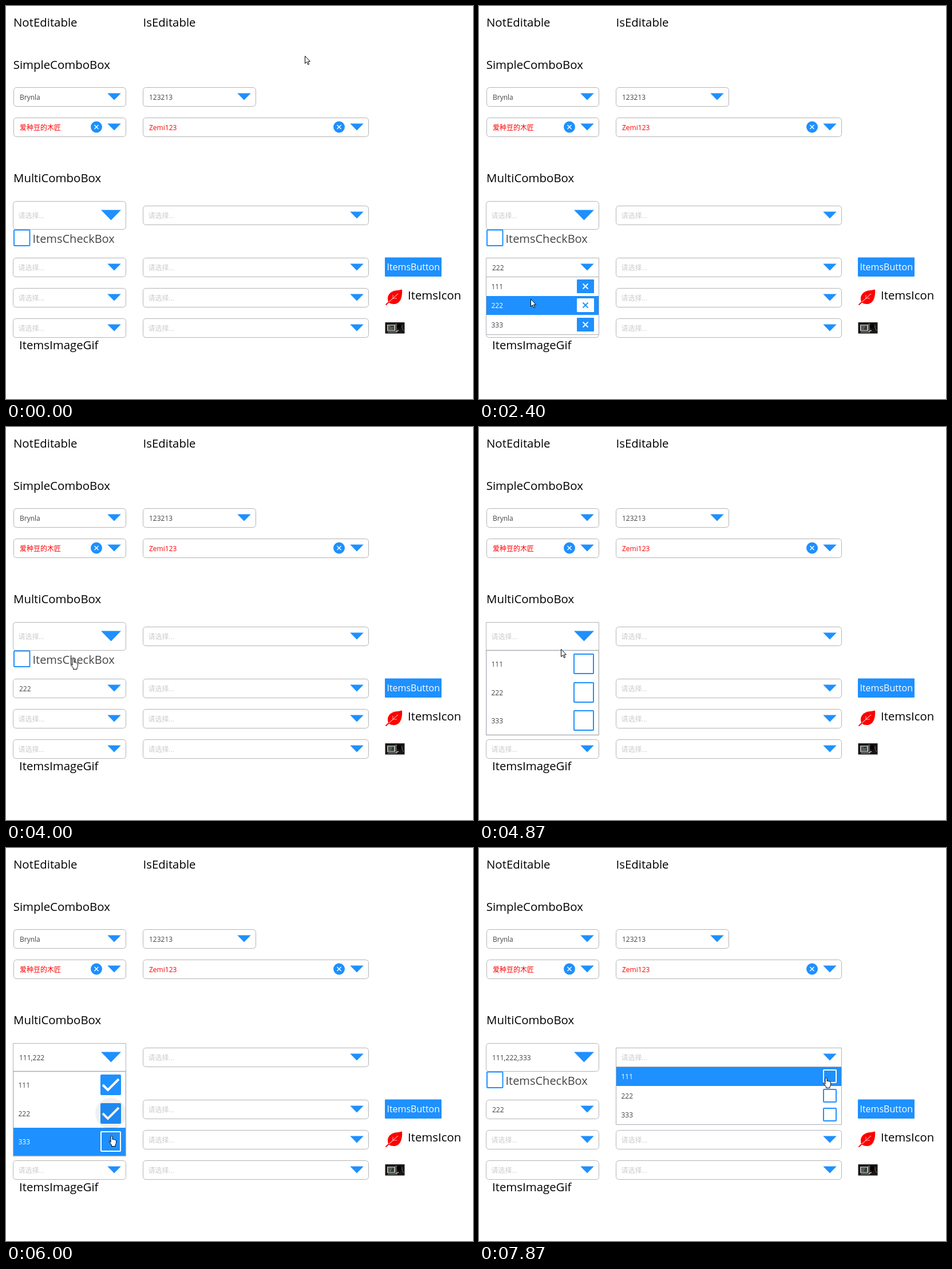
Recreate the animation shown at these times as an HTML page with a canvas. Size 816 by 687 pixels, loop 8 s.

```html
<!DOCTYPE html>
<html lang="zh-CN">
<head>
<meta charset="utf-8">
<style>
html, body { margin: 0; width: 100%; height: 100%; overflow: hidden; background: #fff; }
canvas { display: block; }
</style>
</head>
<body>
<canvas id="stage" width="816" height="687"></canvas>
<script>
const ctx = document.getElementById('stage').getContext('2d');
const LOOP = 8000, BLUE = '#1e90ff', BORDER = '#b4b4b4', DARK = '#444';
const FONT = '"Open Sans", "Noto Sans CJK SC", "Noto Sans CJK", sans-serif';
const ITEMS = ['111', '222', '333'];

// Pointer path: time, left, top
const PATH = [
  [0, 522, 87], [70, 522, 87], [330, 350, 122], [600, 187, 155], [800, 187, 155],
  [1200, 190, 300], [1600, 186, 453], [1780, 186, 453], [2270, 90, 512], [2480, 90, 512],
  [3000, 150, 308], [3330, 130, 345], [3470, 130, 345], [3730, 113, 405], [4000, 113, 405],
  [4130, 168, 359], [4270, 172, 359], [4400, 179, 361], [4640, 179, 361], [4870, 143, 388],
  [5130, 179, 410], [5400, 179, 410], [5640, 181, 458], [5820, 181, 458], [6000, 180, 503],
  [6220, 180, 503], [6470, 190, 358], [6670, 190, 358], [6930, 300, 362], [7330, 607, 361],
  [7480, 607, 361], [7730, 605, 395], [7870, 602, 401], [8000, 602, 401]
];
const ARROW = new Path2D('M0 0V13L3 10.2L5.2 15L7.2 14.2L5 9.5H9Z');
const HAND = new Path2D('M2.5 11V1Q4 -1 5.5 1V6Q7 4.8 8 6.4Q9.4 5.4 10.2 7Q11.8 6.4 12 8V12Q11.8 14 10.5 15.5V18H4V15.8L0 10.5Q-.8 8.8 1 8.8Z');
const LEAF = new Path2D('M692 495.5C693 507 690 520 679 521Q673 521.5 669 518.5C664 509 669 500 680 497.5Q687 497 692 495.5Z');

const POPUPS = {
  button: { x: 13, y: 473, w: 196, row: 33.5, open: 1670, close: 3470 },
  large: { x: 13, y: 390, w: 196, row: 49.3, open: 4600, close: 6500, checks: [5290, 5740, 6160] },
  wide: { x: 240, y: 382.5, w: 393, row: 33.5, open: 7400, close: 9000, checks: [9000, 9000, 9000] }
};

let time, mouse, hand;

function pointer(t) {
  const i = Math.max(1, PATH.findIndex(p => p[0] >= t));
  const [t0, x0, y0] = PATH[i - 1], [t1, x1, y1] = PATH[i];
  const u = (t - t0) / (t1 - t0), k = u * u * (3 - 2 * u);
  return { x: x0 + (x1 - x0) * k, y: y0 + (y1 - y0) * k };
}

function over(x, y, w, h) {
  const px = mouse.x + 3, py = mouse.y;
  return px >= x && px < x + w && py >= y && py < y + h;
}

function hot(x, y, w, h) {
  const hit = over(x, y, w, h);
  if (hit) hand = true;
  return hit;
}

function text(str, x, y, size = 12, color = DARK) {
  ctx.font = `${size}px ${FONT}`;
  ctx.fillStyle = color;
  ctx.fillText(str, x, y);
}

function rect(x, y, w, h, fill, stroke, width = 1, radius = 0) {
  ctx.beginPath();
  ctx.roundRect(x, y, w, h, radius);
  if (fill) { ctx.fillStyle = fill; ctx.fill(); }
  if (stroke) { ctx.strokeStyle = stroke; ctx.lineWidth = width; ctx.stroke(); }
}

function line(points, color, width) {
  ctx.beginPath();
  points.forEach(([x, y]) => ctx.lineTo(x, y));
  ctx.strokeStyle = color;
  ctx.lineWidth = width;
  ctx.stroke();
}

function cross(x, y, r, color, width) {
  line([[x - r, y - r], [x + r, y + r]], color, width);
  line([[x + r, y - r], [x - r, y + r]], color, width);
}

function triangle(cx, cy, w, h) {
  ctx.save();
  if (hot(cx - w / 2, cy - h / 2, w, h)) {
    ctx.shadowColor = '#0008';
    ctx.shadowBlur = 5;
    ctx.shadowOffsetX = ctx.shadowOffsetY = 1;
  }
  ctx.beginPath();
  ctx.moveTo(cx - w / 2, cy - h / 2);
  ctx.lineTo(cx + w / 2, cy - h / 2);
  ctx.lineTo(cx, cy + h / 2);
  ctx.fillStyle = BLUE;
  ctx.fill();
  ctx.restore();
}

function combo(x, y, w, { value, color = DARK, clear, big, popup } = {}) {
  const h = big ? 49 : 33, cy = y + h / 2;
  const square = popup && time >= popup.open && time < popup.close + 200;
  rect(x + .5, y + .5, w, h, '#fff', BORDER, 1, square ? 0 : 5);
  if (value) text(value, x + 11, cy + 5, 12, color);
  else text('请选择...', x + 9.5, cy + 5, 12, '#ccc');
  if (big) triangle(x + 171.5, cy, 35, 18);
  else triangle(x + w - 20, cy, 23.5, 12);
  if (clear) {
    const cx = x + w - 51;
    hot(cx - 10, cy - 10, 20, 20);
    ctx.beginPath();
    ctx.arc(cx, cy, 10, 0, 7);
    ctx.fillStyle = BLUE;
    ctx.fill();
    cross(cx, cy, 3.5, '#fff', 1.4);
  }
}

function checkBox(x, y, size, checked, color) {
  rect(x + 1, y + 1, size - 2, size - 2, checked ? BLUE : null, color, 2, 1);
  if (checked) {
    const s = size / 36;
    line([[x + 4 * s, y + 18 * s], [x + 13 * s, y + 27 * s], [x + 32 * s, y + 8 * s]], '#fff', 4 * s);
  }
}

function ripple(x, y, age) {
  if (age < 0 || age > 450) return;
  ctx.beginPath();
  ctx.arc(x, y, 27 * Math.min(1, age / 220), 0, 7);
  ctx.fillStyle = `rgba(0,0,0,${.08 * Math.min(1, (450 - age) / 250)})`;
  ctx.fill();
}

function popupList({ x, y, w, row, open, close, checks }) {
  if (time < open || time >= close) return;
  const h = row * 3 + .5, shown = h * Math.min(1, (time - open) / 180);
  ctx.save();
  ctx.beginPath();
  ctx.rect(x - 1, y - 1, w + 2, shown + 2);
  ctx.clip();
  rect(x, y, w, h, '#fff');
  if (over(x, y, w, h)) hand = false;
  ITEMS.forEach((item, i) => {
    const top = Math.round(y + row * i), bottom = Math.round(y + row * (i + 1));
    const cy = Math.floor((top + bottom) / 2), active = over(x, top, w, bottom - top);
    if (active) rect(x, top, w, bottom - top, BLUE);
    text(item, x + 8.5, cy + 5, 12, active ? '#fff' : DARK);
    if (checks) {
      const size = row > 40 ? 36 : 24, left = x + w - 8 - size;
      hot(left, cy - size / 2, size, size);
      checkBox(left, cy - size / 2, size, time >= checks[i], active ? '#fff' : BLUE);
    } else {
      const left = x + 158;
      hot(left, cy - 12, 30, 24);
      rect(left, cy - 12, 30, 24, active ? '#fff' : BLUE, null, 0, 1);
      cross(left + 15, cy, 4.5, active ? BLUE : '#fff', 1.8);
    }
  });
  if (checks) checks.forEach((t, i) => ripple(x + w - 26, y + row * (i + .5), time - t));
  rect(x - .5, Math.floor(y) + .5, w + 1, Math.round(h), null, '#a9adb5', row > 40 ? 1.6 : 1);
  ctx.restore();
}

function leaf() {
  ctx.fillStyle = '#f00';
  ctx.fill(LEAF);
  line([[663.5, 522.5], [670, 516.5]], '#f00', 1.8);
  line([[669, 517.5], [685, 503]], '#fff', 1);
  line([[676, 511], [676, 505]], '#fff', .7);
  line([[676, 511], [683, 511]], '#fff', .7);
}

// Small moving picture: a figure at a monitor
function picture() {
  const step = Math.floor(time / 67), sway = Math.sin(step * .7);
  rect(662.5, 553, 34, 19.5, '#181616');
  rect(666, 557, 14, 11, '#b4b4ae');
  rect(668, 558.5, 10, 8, '#303a35');
  for (let i = 0; i < 3; i++) rect(669, 559.5 + i * 2.3, 3 + (step * 3 + i * 5) % 6, 1, '#7f8f86');
  rect(667, 569, 17, 1.5, '#888');
  rect(680, 555, 3, 12, '#55514e');
  ctx.fillStyle = '#050505';
  ctx.beginPath();
  ctx.arc(687 + sway * .5, 560, 4, 0, 7);
  ctx.ellipse(689, 571, 6, 7, 0, Math.PI, 0);
  ctx.fill();
  line([[692 + sway * .4, 558], [692, 563], [695, 568]], '#77716d', 1);
  line([[681, 569 + sway * .5], [686, 567]], '#c4b8b0', 1.6);
}

function draw() {
  time = performance.now() % LOOP;
  mouse = pointer(time);
  hand = false;
  const { button, large, wide } = POPUPS;
  ctx.fillStyle = '#fff';
  ctx.fillRect(0, 0, 816, 687);

  const heading = (s, x, y) => text(s, x, y, 20.4, '#000');
  heading('NotEditable', 13, 36);
  heading('IsEditable', 239.5, 36);
  heading('SimpleComboBox', 12.7, 109.5);
  heading('MultiComboBox', 13, 308);
  heading('ItemsIcon', 702, 513);
  heading('ItemsImageGif', 23, 599.5);

  combo(13, 142, 196, { value: 'Brynla' });
  combo(239, 142, 197, { value: '123213' });
  combo(13, 195, 196, { value: '爱种豆的木匠', color: '#f00', clear: true });
  combo(239, 195, 394, { value: 'Zemi123', color: '#f00', clear: true });

  const picked = ITEMS.filter((_, i) => time >= large.checks[i]).join();
  combo(12, 341, 197, { value: picked, big: true, popup: large });
  combo(239, 349, 394, { popup: wide });
  combo(12, 440, 197, { value: time >= 2330 ? '222' : '', popup: button });
  combo(239, 440, 394);
  for (const y of [493, 546]) {
    combo(12, y, 197);
    combo(239, y, 394);
  }

  hot(13, 391, 178, 29);
  checkBox(13, 390.5, 29.5, false, BLUE);
  text('ItemsCheckBox', 46.5, 413.5, 20);
  rect(662, 439.5, 99, 33.5, BLUE, null, 0, 1);
  text('ItemsButton', 665.5, 462, 16, '#fff');
  leaf();
  picture();
  Object.values(POPUPS).forEach(popupList);

  ctx.save();
  ctx.translate(Math.round(mouse.x) + .5, Math.round(mouse.y) + .5);
  const shape = hand ? HAND : ARROW;
  ctx.fillStyle = '#fff';
  ctx.fill(shape);
  ctx.strokeStyle = '#000';
  ctx.lineWidth = 1;
  ctx.stroke(shape);
  ctx.restore();
  requestAnimationFrame(draw);
}
draw();
</script>
</body>
</html>
```
